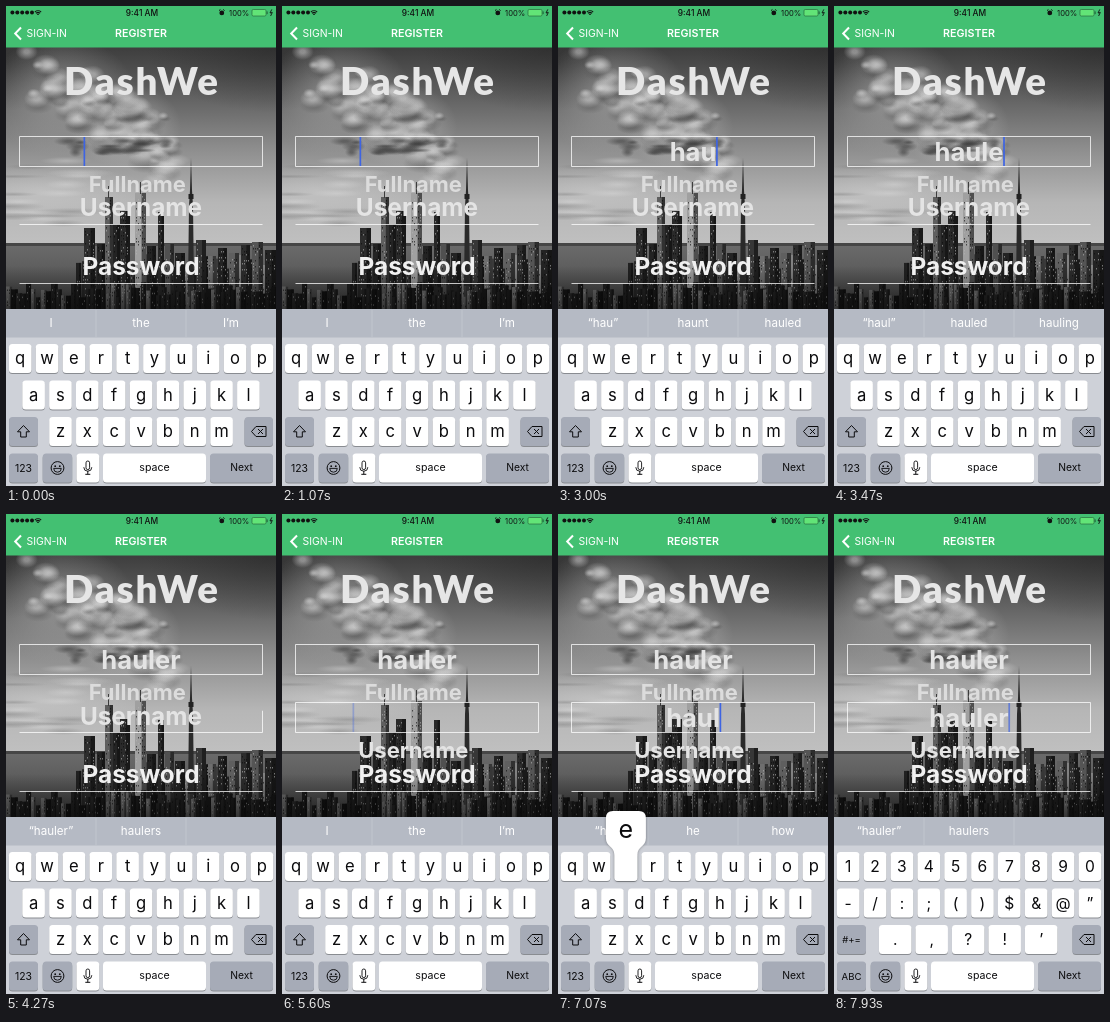
An HTML page with a canvas that plays this animation: 270x480 px, repeating every 8000 ms.

```html
<!DOCTYPE html>
<html lang="en">
<head>
<meta charset="utf-8">
<title>Register</title>
<style>
html, body { margin: 0; width: 100%; height: 100%; overflow: hidden; background: #d0d3d9; }
canvas { display: block; width: 270px; height: 480px; }
</style>
</head>
<body>
<canvas id="stage"></canvas>
<script>
const W = 270, H = 480, LOOP = 8000;
const SANS = 'Inter, "Liberation Sans", sans-serif';
const scale = Math.max(1, window.devicePixelRatio || 1);

function setup(canvas) {
  canvas.width = W * scale;
  canvas.height = H * scale;
  const c = canvas.getContext('2d');
  c.scale(scale, scale);
  return c;
}
const g = setup(document.getElementById('stage'));

const clamp = v => Math.max(0, Math.min(1, v));
const ramp = (t, from, to) => clamp((t - from) / (to - from));
const ease = p => p * p * (3 - 2 * p);
const lerp = (a, b, p) => a + (b - a) * p;
const grey = (v, a = 1) => `rgba(${v},${v},${v},${a})`;

function rect(c, x, y, w, h, fill) {
  c.fillStyle = fill;
  c.fillRect(x, y, w, h);
}

function text(str, x, y, size, color, weight = 400, align = 'center', family = SANS) {
  g.font = `${weight} ${size}px ${family}`;
  g.textAlign = align;
  g.fillStyle = color;
  g.fillText(str, x, y);
}

function line(points, color, width = 1, close = false) {
  g.beginPath();
  points.forEach(([x, y], i) => i ? g.lineTo(x, y) : g.moveTo(x, y));
  if (close) g.closePath();
  g.strokeStyle = color;
  g.lineWidth = width;
  g.stroke();
}

function disc(x, y, r, fill) {
  g.beginPath();
  g.arc(x, y, r, 0, 7);
  g.fillStyle = fill;
  g.fill();
}

function ring(x, y, r, from, to, width, color) {
  g.beginPath();
  g.arc(x, y, r, from, to);
  g.strokeStyle = color;
  g.lineWidth = width;
  g.stroke();
}

// ---- backdrop: grey sky, lake and skyline ----
function makeBackdrop() {
  const canvas = document.createElement('canvas');
  const c = setup(canvas);
  let seed = 11;
  const rnd = () => (seed = seed * 16807 % 2147483647) / 2147483647;

  const sky = c.createLinearGradient(0, 42, 0, 240);
  [[0, 62], [0.25, 98], [0.5, 140], [0.78, 182], [1, 192]]
    .forEach(([p, v]) => sky.addColorStop(p, grey(v)));
  rect(c, 0, 0, W, H, sky);

  function puff(x, y, rx, ry, v, a, core = 0) {
    c.save();
    c.translate(x, y);
    c.scale(rx, ry);
    const f = c.createRadialGradient(0, 0, core, 0, 0, 1);
    f.addColorStop(0, grey(v, a));
    f.addColorStop(1, grey(v, 0));
    c.fillStyle = f;
    c.fillRect(-1, -1, 2, 2);
    c.restore();
  }
  puff(270, 42, 130, 65, 35, 0.5);
  puff(0, 55, 55, 50, 45, 0.6);
  puff(55, 90, 75, 60, 175, 0.6);
  puff(120, 120, 55, 42, 200, 0.6);
  puff(35, 185, 110, 26, 205, 0.6);
  // billows drift down and right, lit on top and dark underneath
  for (let i = 0; i < 75; i++) {
    const p = rnd(), x = 20 + p * 125 + rnd() * 26, y = 44 + p * 70 + rnd() * 48, r = 5 + rnd() * 11;
    puff(x + 2, y + r * 0.6, r * 1.2, r * 0.6, 80, 0.4, 0.2);
    puff(x, y, r, r * 0.75, 215, 0.5, 0.2);
  }
  for (let i = 0; i < 18; i++)
    puff(62 + rnd() * 105, 134 + rnd() * 14, 6 + rnd() * 10, 2 + rnd() * 4, 60, 0.55, 0.2);
  for (let i = 0; i < 16; i++)
    puff(rnd() * 75, 150 + rnd() * 70, 15 + rnd() * 25, 2 + rnd() * 3, rnd() < 0.5 ? 120 : 220, 0.4);
  for (let i = 0; i < 6; i++)
    puff(150 + i * 4, 174 - i * 4, 14, 6, 220, 0.4);

  const lake = c.createLinearGradient(0, 236, 0, 303);
  lake.addColorStop(0, grey(108));
  lake.addColorStop(1, grey(72));
  rect(c, 0, 238, W, 66, lake);
  rect(c, 0, 237, W, 3, grey(70));

  function tower(x, w, top, v) {
    rect(c, x, top, w, 304 - top, grey(v));
    rect(c, x + w * 0.6, top, w * 0.4, 304 - top, grey(12, 0.55));
    for (let y = top + 3; y < 300; y += 3)
      for (let k = x + 1; k < x + w - 1; k += 2)
        if (rnd() < 0.45) rect(c, k, y, 1, 1.5, grey(rnd() < 0.5 ? 180 : 10, 0.6));
  }
  for (let x = 70; x < W; x += 6)
    tower(x, 5 + rnd() * 3, 248 + rnd() * 18, rnd() < 0.3 ? 130 : 25 + rnd() * 35);
  [
    [78, 11, 222, 45], [91, 8, 238, 35], [99, 8, 191, 95], [107, 7, 218, 35], [114, 10, 205, 42],
    [129, 11, 187, 160], [141, 9, 240, 35], [152, 6, 206, 40], [159, 9, 238, 80], [169, 10, 247, 35],
    [190, 10, 234, 55], [202, 8, 250, 110], [212, 9, 242, 35], [223, 10, 247, 95], [235, 9, 239, 45],
    [246, 11, 236, 85], [259, 11, 244, 35]
  ].forEach(b => tower(...b));
  for (let x = 0; x < W; x += 5)
    tower(x, 4 + rnd() * 3, 276 + rnd() * 16, rnd() < 0.25 ? 120 : 15 + rnd() * 30);
  rect(c, 134, 176, 1, 12, grey(60));
  rect(c, 102, 180, 1, 12, grey(60));

  c.fillStyle = grey(42);
  c.beginPath();
  [[185, 152], [186, 184], [187, 200], [188, 280], [182, 280], [183, 200], [184, 184]]
    .forEach(p => c.lineTo(...p));
  c.fill();
  rect(c, 182.5, 188, 5, 5, grey(34));

  const shade = c.createLinearGradient(0, 260, 0, 303);
  shade.addColorStop(0, grey(8, 0));
  shade.addColorStop(1, grey(8, 0.6));
  rect(c, 0, 260, W, 44, shade);
  return canvas;
}
const backdrop = makeBackdrop();

// ---- timeline ----
const WORD = 'hauler';
const typed1 = [2400, 2620, 2870, 3180, 3400, 3630];
const typed2 = [6400, 6600, 6800, 6960, 7140, 7310];
const NEXT_AT = 4130, FOCUS_AT = 4230, SYMBOLS_AT = 7530;
const START = ['I', 'the', 'I’m'];
const DONE = ['“hauler”', 'haulers', ''];
const hints = [
  [0, START], [2470, ['“h”', 'he', 'how']], [2690, ['“ha”', 'had', 'have']],
  [2930, ['“hau”', 'haunt', 'hauled']], [3250, ['“haul”', 'hauled', 'hauling']], [3720, DONE],
  [4400, START], [6500, ['“h”', 'he', 'how']], [7200, ['“haul”', 'hauled', 'hauling']], [7380, DONE]
];
// caret fades: [start, end, alpha reached]
const fades = [
  [370, 600, 0], [970, 1070, 1], [1440, 1670, 0], [1970, 2070, 1], [4060, 4200, 0],
  [4430, 4530, 1], [5040, 5270, 0], [5560, 5680, 1], [6040, 6270, 0], [6390, 6400, 1], [7860, 8080, 0]
];
const typedBy = (times, t) => WORD.slice(0, times.filter(k => t >= k).length);
const caretAlpha = t => fades.reduce((a, [s, e, to]) => lerp(a, to, ramp(t, s, e)), 1);

// ---- top of the screen ----
function drawHeader() {
  rect(g, 0, 0, W, 41.5, '#43c072');
  for (let i = 0; i < 5; i++) disc(6.4 + i * 4.9, 6.5, 2, '#111');
  for (let i = 1; i < 4; i++) ring(32, 9.3, i * 1.7 - 0.6, -2.35, -0.79, 1.1, '#111');
  text('9:41 AM', 136, 10, 8.4, '#111', 500);
  disc(215.8, 6.9, 2.4, '#111');
  line([[213, 4.6], [214.4, 3.5]], '#111');
  line([[218.6, 4.6], [217.2, 3.5]], '#111');
  text('100%', 243.2, 9.8, 7.6, '#111', 400, 'right');
  g.beginPath();
  g.roundRect(246, 3.5, 14, 6.5, 1.3);
  g.fillStyle = '#62e477';
  g.fill();
  g.strokeStyle = '#205c33';
  g.lineWidth = 0.6;
  g.stroke();
  rect(g, 260.6, 5.4, 1, 2.7, '#205c33');
  line([[265.8, 3.4], [264, 7], [266.3, 6.5], [264.6, 10]], '#111', 0.9);

  line([[15, 21.5], [9.2, 27.5], [15, 33.5]], '#fff', 2);
  text('SIGN-IN', 20.5, 31.2, 10.4, '#fff', 400, 'left');
  text('REGISTER', 135, 31.2, 10.7, '#fff', 600);
  g.letterSpacing = '1.8px';
  text('DashWe', 136, 88.5, 38.5, '#e6e6e6', 900, 'center', 'Lato, sans-serif');
  g.letterSpacing = '0px';
}

// Underline grows clockwise into a full frame while the label slides below.
function drawField(label, bottom, open, slide, color) {
  const left = 13.5, right = 256.5, h = 30, w = right - left;
  const total = 2 * (w + h);
  const length = lerp(w, total, open);
  g.setLineDash([length, total]);
  line([[left, bottom], [right, bottom], [right, bottom - h], [left, bottom - h]],
    'rgba(255,255,255,0.75)', 1, true);
  g.setLineDash([]);
  g.save();
  g.translate(lerp(135, 131.3, slide), lerp(bottom - 17.5, bottom + 17, slide));
  const k = lerp(1, 0.9, slide);
  g.scale(k, k);
  text(label, 0, 9, 24.4, color, 700);
  g.restore();
}

function drawEntry(word, bottom, emptyX, alpha) {
  text(word, 135, bottom - 6, 25.6, '#e4e4e4', 700);
  const x = word ? 135.5 + g.measureText(word).width / 2 : emptyX;
  if (alpha > 0) rect(g, x - 0.8, bottom - 29.5, 1.7, 29, `rgba(62,100,226,${alpha})`);
}

function drawForm(t) {
  const open = ease(ramp(t, FOCUS_AT, FOCUS_AT + 250));
  const slide = ease(ramp(t, FOCUS_AT + 10, FOCUS_AT + 320));
  const alpha = caretAlpha(t), second = t >= FOCUS_AT;
  drawField('Fullname', 160.5, 1, 1, '#dcdcdc');
  drawField('Username', 218.5, open, slide, '#e4e4e4');
  drawField('Password', 277.5, 0, 0, '#f0f0f0');
  drawEntry(typedBy(typed1, t), 160.5, 78.3, second ? 0 : alpha);
  drawEntry(typedBy(typed2, t), 218.5, 71.3, second ? alpha : 0);
}

// ---- keyboard ----
const WHITE = '#fff', DARK = '#a6abb7', INK = '#0c0c0e';
const rowOf = (chars, first, y, pitch = 26.85, w = 22.6) =>
  [...chars].map((ch, i) => ({ ch, x: first + i * pitch, y, w }));
const letters = [
  ...rowOf('qwertyuiop', 14.2, 338), ...rowOf('asdfghjkl', 27.6, 374.5), ...rowOf('zxcvbnm', 54.5, 411)
];
const symbols = [
  ...rowOf('1234567890', 14.2, 338), ...rowOf('-/:;()$&@”', 14.2, 374.5), ...rowOf('.,?!’', 61.2, 411, 36.5, 32.5)
];

function key(x, y, w, fill) {
  for (const [dy, color] of [[1, '#898c91'], [0, fill]]) {
    g.beginPath();
    g.roundRect(x, y + dy, w, 29, 3.5);
    g.fillStyle = color;
    g.fill();
  }
}

function drawPopup({ ch, x, y }) {
  const top = y - 41;
  g.save();
  g.shadowColor = 'rgba(0,0,0,0.35)';
  g.shadowBlur = 3 * scale;
  g.beginPath();
  g.moveTo(x - 13, top);
  g.lineTo(x + 13, top);
  g.quadraticCurveTo(x + 20, top, x + 20, top + 7);
  g.lineTo(x + 20, top + 27);
  g.bezierCurveTo(x + 20, top + 36, x + 11.5, top + 35, x + 11.5, top + 44);
  g.lineTo(x + 11.5, y + 26);
  g.quadraticCurveTo(x + 11.5, y + 29, x + 8, y + 29);
  g.lineTo(x - 8, y + 29);
  g.quadraticCurveTo(x - 11.5, y + 29, x - 11.5, y + 26);
  g.lineTo(x - 11.5, top + 44);
  g.bezierCurveTo(x - 11.5, top + 35, x - 20, top + 36, x - 20, top + 27);
  g.lineTo(x - 20, top + 7);
  g.quadraticCurveTo(x - 20, top, x - 13, top);
  g.fillStyle = WHITE;
  g.fill();
  g.restore();
  text(ch, x, top + 27, 25, INK);
}

function drawIcons(numeric) {
  if (numeric) text('#+=', 17.5, 429, 9.5, INK);
  else line([[17.5, 419.5], [23.5, 425.8], [20.3, 425.8], [20.3, 431], [14.7, 431], [14.7, 425.8], [11.5, 425.8]], INK, 1, true);
  line([[245.5, 425.5], [250, 420.5], [260, 420.5], [260, 430.5], [250, 430.5]], INK, 1, true);
  line([[252, 423], [257, 428]], INK);
  line([[257, 423], [252, 428]], INK);

  ring(51.5, 462, 6.4, 0, 7, 1, INK);
  disc(49.2, 460.2, 0.9, INK);
  disc(53.8, 460.2, 0.9, INK);
  g.beginPath();
  g.arc(51.5, 462.4, 3.8, 0, Math.PI);
  g.closePath();
  g.lineWidth = 0.9;
  g.stroke();

  g.beginPath();
  g.roundRect(80, 455, 3.6, 8.6, 1.8);
  g.stroke();
  ring(81.8, 461.2, 4, 0, Math.PI, 0.9, INK);
  line([[81.8, 465], [81.8, 468.3]], INK);
  line([[79.3, 468.3], [84.3, 468.3]], INK);
}

function drawKeyboard(t) {
  rect(g, 0, 303, W, 177, '#ced1d8');
  rect(g, 0, 303, W, 28.5, '#b5bac4');
  for (const x of [90, 180]) rect(g, x - 0.4, 304, 0.8, 27, '#c6cbd2');
  const words = hints.filter(h => t >= h[0]).pop()[1];
  words.forEach((word, i) => text(word, 45 + i * 90, 321, 11.6, '#fff'));

  const numeric = t >= SYMBOLS_AT;
  for (const { ch, x, y, w } of numeric ? symbols : letters) {
    key(x - w / 2, y, w, WHITE);
    text(ch, x, y + 20, numeric ? 15.6 : 16.6, INK);
  }
  key(3, 411, 29, DARK);
  key(238.5, 411, 28.5, DARK);
  key(3, 447.5, 29, t >= SYMBOLS_AT - 60 && t < SYMBOLS_AT + 80 ? WHITE : DARK);
  key(36.7, 447.5, 29.5, DARK);
  key(70.5, 447.5, 22.8, WHITE);
  key(97, 447.5, 103, WHITE);
  key(204, 447.5, 63, t >= NEXT_AT && t < NEXT_AT + 110 ? WHITE : DARK);
  text(numeric ? 'ABC' : '123', 17.5, 465.6, numeric ? 9.6 : 10.4, INK);
  text('space', 148.5, 465, 10.6, INK);
  text('Next', 235.5, 465, 10.3, INK);
  drawIcons(numeric);

  for (const times of [typed1, typed2]) {
    const i = times.findIndex(k => t >= k - 100 && t < k + 25);
    if (i >= 0) drawPopup(letters.find(k => k.ch === WORD[i]));
  }
}

function draw(t) {
  g.drawImage(backdrop, 0, 0, W, H);
  drawHeader();
  drawForm(t);
  drawKeyboard(t);
}

const begin = performance.now();
function tick() {
  draw((performance.now() - begin) % LOOP);
  requestAnimationFrame(tick);
}
tick();
</script>
</body>
</html>
```
